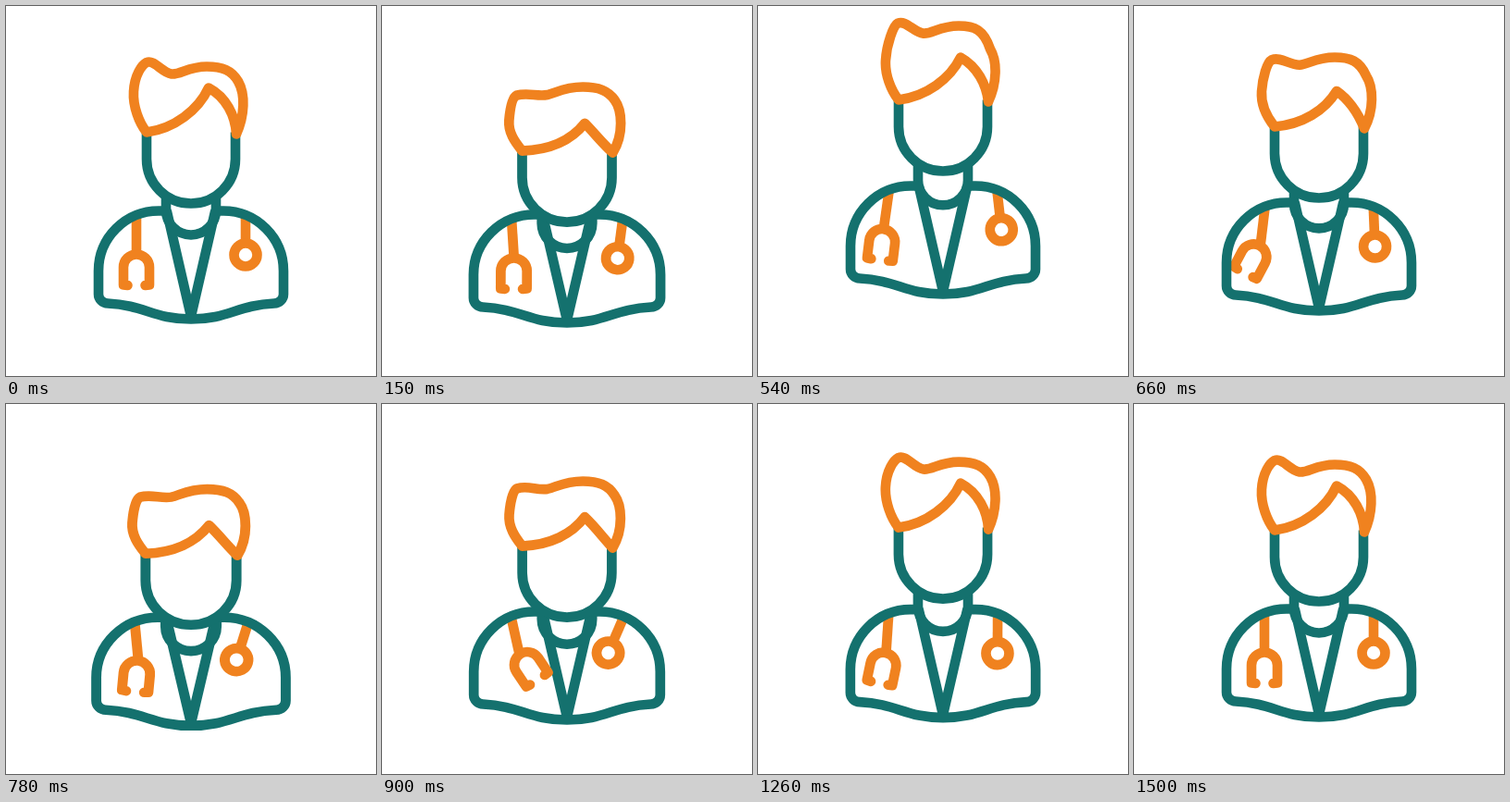
An HTML page that plays this animation: 400x400 px, repeating every 2030 ms.

```html
<!DOCTYPE html>
<html lang="en">
<head>
<meta charset="utf-8">
<title>Jumping doctor</title>
<style>
  html, body { margin: 0; width: 100%; height: 100%; overflow: hidden; background: #fff; }
  svg { display: block; width: 100%; height: 100%; fill: none; stroke-width: 10.6; stroke-linejoin: round; }
  .teal { stroke: #14716e; }
  .orange { stroke: #f0821f; }
  .round { stroke-linecap: round; }
</style>
</head>
<body>
<svg viewBox="0 0 400 400">
  <g id="all">
    <path id="lapels" class="teal round" d="M174 222L200 335L226 222"/>
    <g id="scope" class="orange">
      <g id="rod">
        <path d="M141 227V267"/>
        <path id="fork" class="round" d="M131.500 301.500L127 301V282a14 14 0 0 1 28 0V301L150.500 301.500"/>
      </g>
      <g id="disc">
        <path d="M259 227V258"/>
        <circle cx="259" cy="268.500" r="12.500"/>
      </g>
    </g>
    <path id="neck" class="teal"/>
    <path id="coat" class="teal round" d="M173 221H165A65 65 0 0 0 100 286V311a10 10 0 0 0 10 10C150 323 160 338 200 338S250 323 290 321a10 10 0 0 0 10-10V286A65 65 0 0 0 235 221H227"/>
    <g id="head">
      <path class="teal" d="M152 134V165a48 48 0 0 0 96 0V136"/>
      <path id="hair" class="orange"/>
    </g>
  </g>
</svg>
<script>
const LOOP = 2030, STEP = 30, END = 1500, TAU = 2 * Math.PI;

const wave = (t, peak, period) => Math.cos(TAU * (t - peak) / period);

function ramp(t, from, to) {
  const s = Math.max(0, Math.min(1, (t - from) / (to - from)));
  return s * s * (3 - 2 * s);
}

// Crouch, ballistic flight, then a damped bounce; positive is down.
function hop(t, { takeoff, landing, dip, height, bounce, period, decay }) {
  if (t < takeoff) return dip * Math.sin(Math.PI * t / takeoff);
  if (t < landing) {
    const s = (t - takeoff) / (landing - takeoff);
    return -4 * height * s * (1 - s);
  }
  const since = t - landing;
  return bounce * Math.exp(-decay * since) * Math.sin(TAU * since / period);
}

const bodyHop = { takeoff: 176, landing: 700, dip: 9, height: 31.8, bounce: 16.8, period: 490, decay: .0055 };
const headHop = { takeoff: 237, landing: 677, dip: 22, height: 40.8, bounce: 55, period: 740, decay: .005 };

// Pendulum angle that builds up at the start and fades out at the end.
const swing = (t, mean, size, peak, period) =>
  ramp(t, 0, 200) * ramp(t, END, 1000) * (mean + size * wave(t, peak, period));

// Hair outline: k flattens the quiff, up lifts its top.
function hairPath(k, up) {
  const quiff = 60.5 + 15.5 * k + up, dip = 73 + 2.5 * k + up;
  const top = 65 + 2 * k + up, tip = 88 + 18 * k;
  return `M152 136C144 126 137 ${108 + 8 * k} 138 ${92 + 11 * k}
    C139 ${74 + 17 * k} ${147 - 6 * k} ${quiff + 2.5} ${152 - 6 * k} ${quiff}
    C${160 - 2 * k} ${quiff - 3.5} 168 ${dip - 2 + 4 * k} 179 ${dip}
    C188 ${dip + 1 - 3 * k} 197 ${top} 217 ${top}
    C234 ${top} 244 ${top + 4} 251 81
    C259 ${95 - 3 * k} ${258 + 3 * k} 118 249 138
    C${248 - 9 * k} ${118 + 11 * k} ${238 - 9 * k} ${tip + 10} 219 ${tip}
    C${208 - 3 * k} ${tip + 24 - 6 * k} 182 ${132 + 3 * k} 152 136Z`;
}

const set = (id, value, name = 'transform') => document.getElementById(id).setAttribute(name, value);
const shift = y => `translate(0 ${y})`;

function draw(t) {
  const body = hop(t, bodyHop), head = hop(t, headHop);
  const neck = body + (head - body) * .65;
  const wide = 1 + .0026 * Math.max(0, body);
  set('all', `translate(200 .5) scale(${wide} 1) translate(-200 0)`);
  for (const id of ['lapels', 'scope', 'coat']) set(id, shift(body));
  set('head', shift(head));
  set('neck', `M173 ${206 + head}V${220 + neck}a27 27 0 0 0 54 0V${206 + head}`, 'd');

  const rod = swing(t, 1.5, 11, 280, 620);
  set('rod', `rotate(${-rod} 141 231)`);
  set('fork', `rotate(${rod - swing(t, 8, 36, 335, 645)} 141 266)`);
  set('disc', `rotate(${swing(t, 8, 16, 290, 580)} 259 231)`);

  const active = ramp(t, 0, 150) * ramp(t, 1080, 930), flat = wave(t, 170, 660);
  set('hair', hairPath(active * (.55 + .47 * flat), active * 4.75 * (flat - 1)), 'd');
}

function tick() {
  const t = Math.floor(performance.now() % LOOP / STEP) * STEP;
  draw(t < END ? t : 0);
  requestAnimationFrame(tick);
}
tick();
</script>
</body>
</html>
```
